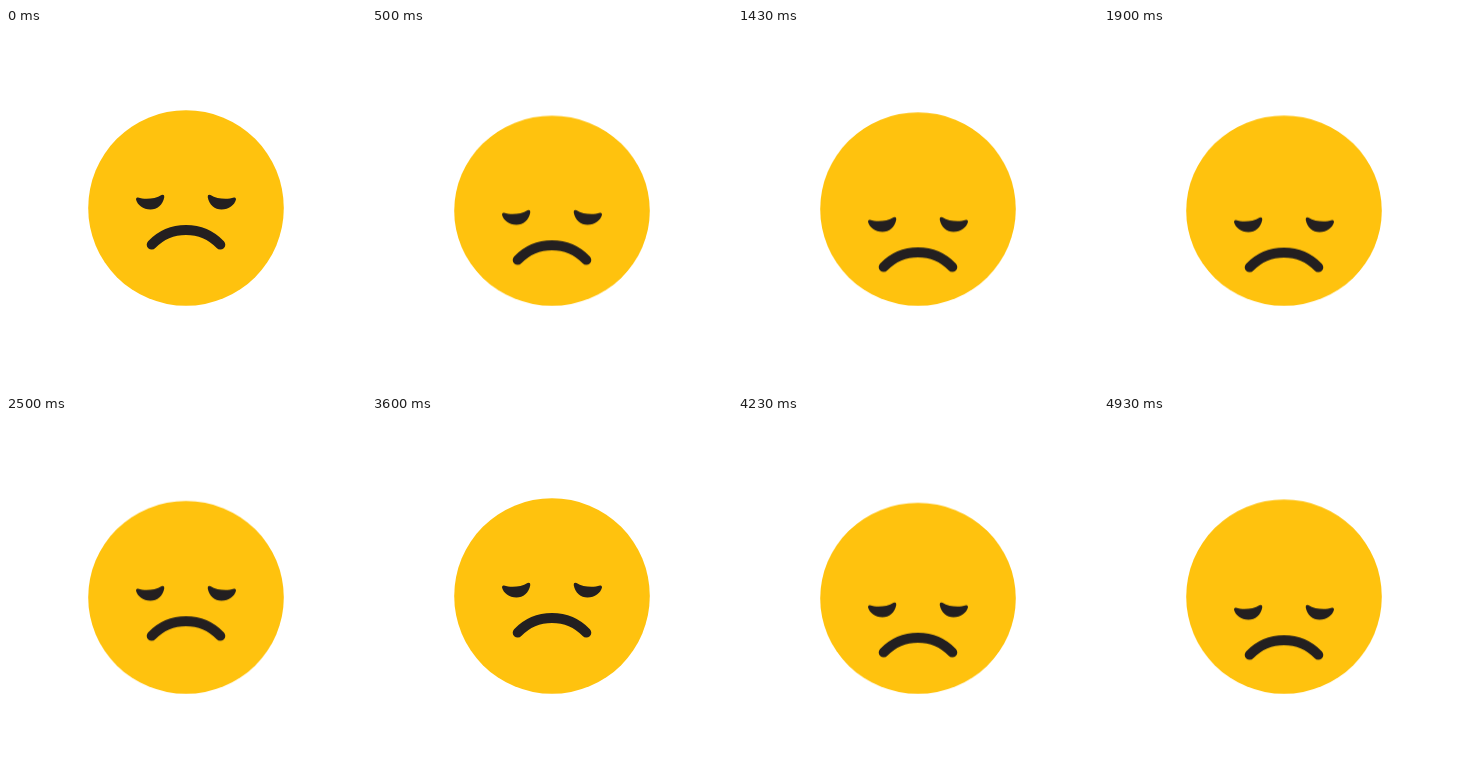
An HTML page that plays this animation: 360x360 px, repeating every 5 s.

```html
<!DOCTYPE html>
<html lang="en">
<head>
<meta charset="utf-8">
<title>Sad face</title>
<style>
  html, body { margin: 0; width: 100%; height: 100%; overflow: hidden; background: #fff; }
  svg { display: block; width: 100vw; height: 100vh; }

  .head { fill: #ffc20e; transform-origin: 180px 277.8px; animation: squash 5s infinite; }
  .features { fill: #231f20; animation: droop 5s infinite; }
  .mouth { fill: none; stroke: #231f20; stroke-width: 10; stroke-linecap: round; }

  .head, .features { animation-timing-function: cubic-bezier(.37, 0, .63, 1); }

  /* A 3.6 s cycle that restarts at 72% and is cut off by the loop */
  @keyframes squash {
    0%, 20%, 60%, 72% { transform: scaleY(1); }
    10%, 40%, 82% { transform: scaleY(.972); }
    92% { transform: scaleY(1); animation-timing-function: cubic-bezier(.333, 0, .667, .333); }
    100% { transform: scaleY(.9903); }
  }
  @keyframes droop {
    0%, 54%, 72% { transform: translateY(0); }
    16%, 88% { transform: translateY(22px); }
    38% { transform: translateY(22.6px); }
    100% { transform: translateY(22.2px); }
  }
</style>
</head>
<body>
<svg viewBox="0 0 360 360">
  <defs>
    <path id="eye" d="M132 169.5C139 172 149 171 155.5 167Q158.5 166 158.3 169C157 177 151 181.5 144.5 181.5C137 181.5 131.5 177 130 171.5Q130 169 132 169.5Z"/>
  </defs>
  <circle class="head" cx="180" cy="180" r="97.8"/>
  <g class="features">
    <use href="#eye"/>
    <use href="#eye" transform="matrix(-1 0 0 1 360 0)"/>
    <path class="mouth" d="M145.7 216.6A47.5 47.5 0 0 1 214.3 216.6"/>
  </g>
</svg>
</body>
</html>
```
